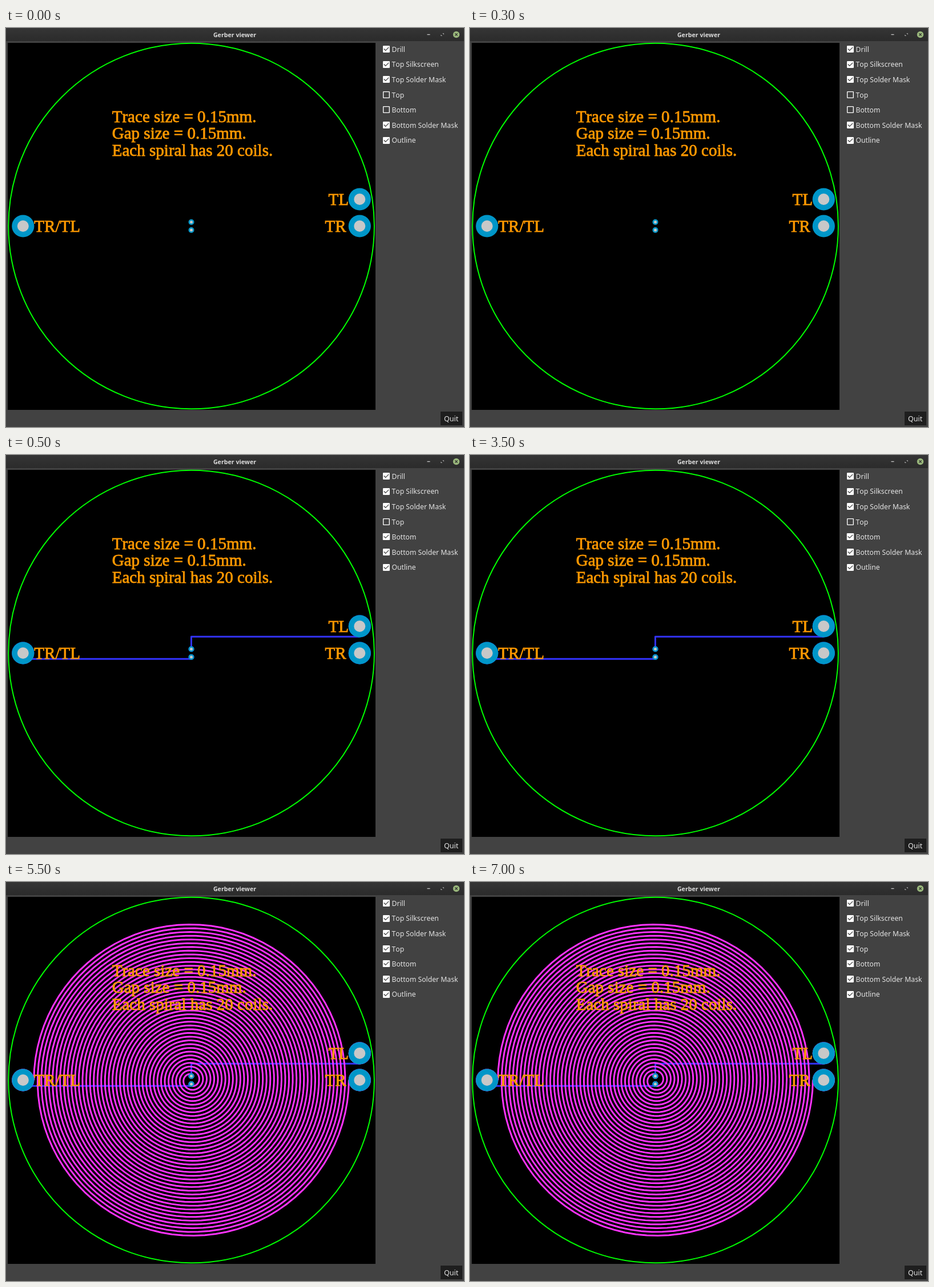
These frames come from a looping animation (802 by 699 pixels, 8000 ms). An HTML page:

```html
<!DOCTYPE html>
<html lang="en">
<head>
<meta charset="utf-8">
<title>Gerber viewer</title>
<style>
  html, body { margin: 0; width: 100%; height: 100%; overflow: hidden; background: #424242; }
  svg { display: block; }
  text { font-kerning: none; }
  .ui { font: 12.2px "Noto Sans", sans-serif; fill: #e4e4e4; }
  .title { font: bold 10.67px "Noto Sans", sans-serif; fill: #dadada; }
  .silk { font: 29.05px "Liberation Serif", serif; fill: #ff9900; stroke: #ff9900; stroke-width: .8; }
  .trace { fill: none; stroke-width: 2.95; stroke-linejoin: round; }
</style>
</head>
<body>
<svg width="802" height="699" viewBox="0 0 802 699">
  <defs>
    <linearGradient id="bar" x2="0" y2="1">
      <stop stop-color="#353535"/><stop offset="1" stop-color="#2b2b2b"/>
    </linearGradient>
    <g id="unchecked"><rect x="4" y="4" width="16" height="16" rx="1" fill="none" stroke="#fff" stroke-width="2"/></g>
    <g id="checked">
      <rect x="3" y="3" width="18" height="18" rx="2" fill="#fff"/>
      <path d="M5.7 11.3 10 15.6 18.3 7.3" fill="none" stroke="#424242" stroke-width="2"/>
    </g>
  </defs>

  <rect width="802" height="699" fill="#424242"/>
  <rect width="802" height="23" fill="url(#bar)"/>
  <text class="title" x="400.5" y="16" text-anchor="middle">Gerber viewer</text>
  <path d="M737.5 11.5h5" stroke="#c8c8c8" stroke-width="1.3"/>
  <path d="M764.2 9.2h2.6v2.6zM761.4 11.4v2.6h2.6z" fill="#b4b4b4"/>
  <circle cx="788.5" cy="11.5" r="5.7" fill="#9ab87c"/>
  <path d="m786.4 9.4 4.2 4.2m0-4.2-4.2 4.2" stroke="#2b2b2b" stroke-width="1.3"/>

  <rect x="3" y="26" width="644" height="643" fill="#000"/>
  <circle cx="324.6" cy="347" r="320.3" fill="none" stroke="#0f0" stroke-width="2"/>

  <g id="bottom" fill="#3333ff">
    <path class="trace" stroke="#3333ff" d="M324.5 340V318.3H619M324.5 354V357.2H30"/>
  </g>
  <g id="top" fill="#ff33ff">
    <path class="trace" id="coils" stroke="#ff33ff"/>
  </g>
  <g id="mask" fill="#0096c8"></g>
  <g class="silk">
    <text x="185.7" y="165">Trace size = 0.15mm.</text>
    <text x="185.7" y="194.3">Gap size = 0.15mm.</text>
    <text x="185.7" y="223.6">Each spiral has 20 coils.</text>
    <text x="564.5" y="310.3">TL</text>
    <text x="558.5" y="357.2">TR</text>
    <text x="49.3" y="357.2">TR/TL</text>
  </g>
  <g id="drill" fill="#c8c8c8"></g>

  <g id="options" class="ui"></g>
  <rect x="761" y="672" width="38" height="24" fill="#1e1e1e"/>
  <text class="ui" x="767" y="688.7" style="font-size:12.5px">Quit</text>
</svg>
<script>
  const LOOP = 8000;
  const SHOW_AT = { Bottom: 500, Top: 5500 };
  const CENTER = { x: 324.6, y: 347 };
  const PX_PER_MM = 19.66;
  const TRACE = 0.15, GAP = 0.15, COILS = 20;
  const $ = id => document.getElementById(id);

  function add(parent, tag, attrs, text = '') {
    const el = document.createElementNS('http://www.w3.org/2000/svg', tag);
    for (const key in attrs) el.setAttribute(key, attrs[key]);
    el.textContent = text;
    parent.append(el);
    return el;
  }

  // Hard switch from hidden to visible, repeated every loop.
  function showFrom(el, time) {
    const offset = time / LOOP;
    el.animate([
      { opacity: 0, offset: 0 }, { opacity: 0, offset },
      { opacity: 1, offset }, { opacity: 1, offset: 1 }
    ], { duration: LOOP, iterations: Infinity });
  }

  // Archimedean arm from a via out to a pad, growing 2/3 mm per turn.
  function arm(offset) {
    const start = 1.5 * Math.PI, end = 2 * Math.PI * (COILS + 1);
    const steps = COILS * 90;
    let d = '';
    for (let i = 0; i <= steps; i++) {
      const angle = start + (end - start) * i / steps;
      const r = PX_PER_MM * (angle + TRACE + GAP) / (3 * Math.PI);
      const x = CENTER.x + r * Math.cos(angle + offset);
      const y = CENTER.y - r * Math.sin(angle + offset);
      d += `${i ? 'L' : 'M'}${x.toFixed(2)} ${y.toFixed(2)}`;
    }
    return d;
  }
  $('coils').setAttribute('d', arm(0) + arm(Math.PI));

  const pads = [[29.8, 347], [619.3, 300], [619.3, 347]].map(p => [...p, 19.6, 10]);
  const vias = [[324.5, 340], [324.5, 354]].map(p => [...p, 5, 2.5]);
  for (const [cx, cy, r, hole] of [...pads, ...vias]) {
    for (const id of ['bottom', 'top', 'mask']) add($(id), 'circle', { cx, cy, r });
    add($('drill'), 'circle', { cx, cy, r: hole });
  }

  const names = ['Drill', 'Top Silkscreen', 'Top Solder Mask', 'Top', 'Bottom', 'Bottom Solder Mask', 'Outline'];
  names.forEach((name, i) => {
    const y = 37 + i * 26.6;
    const transform = `translate(658 ${Math.round(y) - 8}) scale(${2 / 3})`;
    const icon = state => add($('options'), 'use', { href: '#' + state, transform });
    add($('options'), 'text', { x: 675.5, y: y + 4.7 }, name);
    if (name in SHOW_AT) {
      icon('unchecked');
      showFrom(icon('checked'), SHOW_AT[name]);
      showFrom($(name.toLowerCase()), SHOW_AT[name]);
    } else {
      icon('checked');
    }
  });
</script>
</body>
</html>
```
